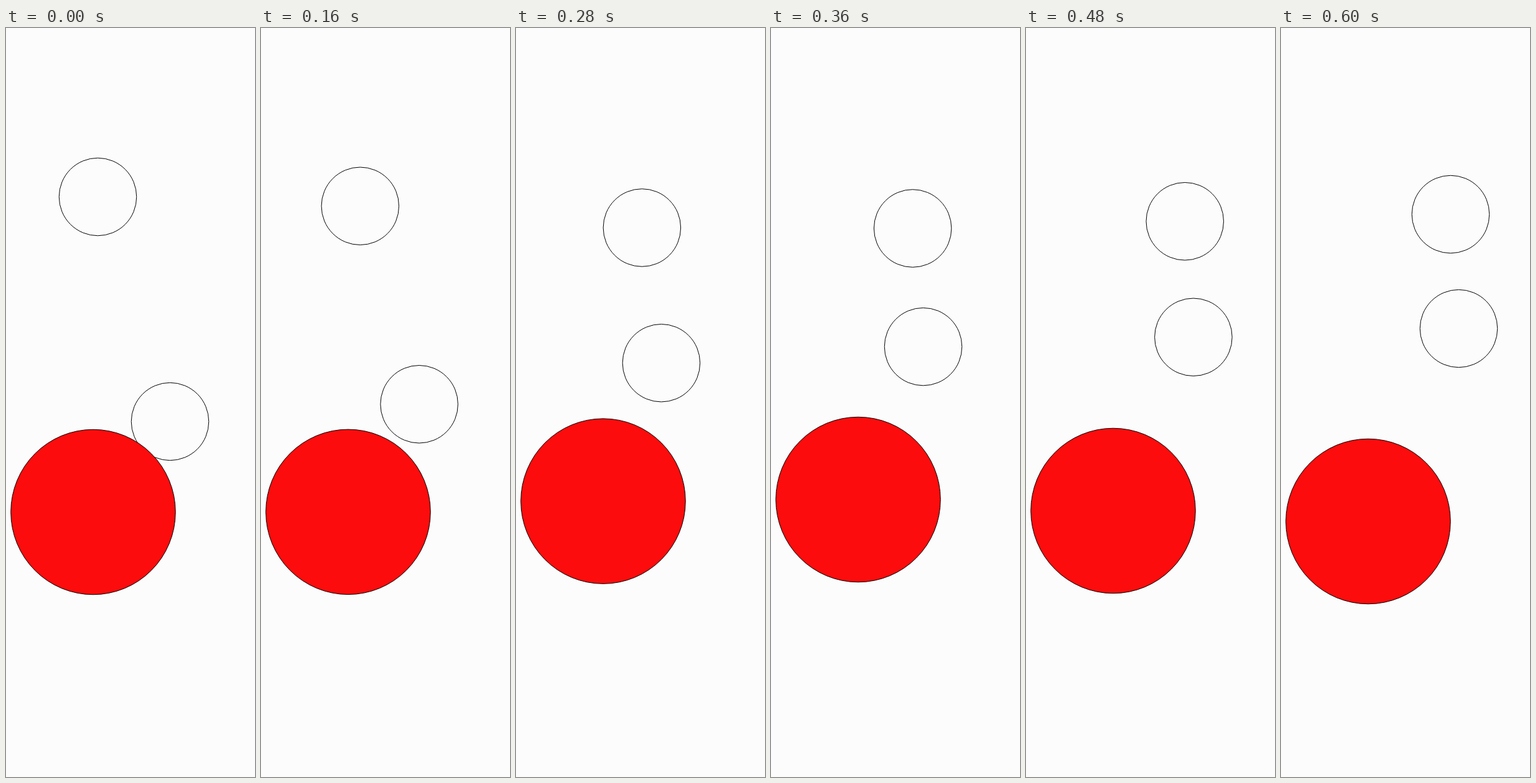
Animation, 400 px wide and 1200 px high, one loop 640 ms. Source, as an HTML page with a canvas:

```html
<!DOCTYPE html>
<html lang="en">
<head>
<meta charset="utf-8">
<title>Colliding circles</title>
<style>
  html, body { margin: 0; width: 100%; height: 100%; overflow: hidden; background: #fcfcfc; }
  canvas { display: block; }
</style>
</head>
<body>
<canvas id="stage" width="400" height="1200"></canvas>
<script>
const ctx = document.getElementById('stage').getContext('2d');
const LOOP = 640, STEP = 40;
const PAPER = '#fcfcfc', INK = '#000', RED = '#fc0c0c';

// Progress from 0 to 1 between two times, at even speed or eased at both ends.
const linear = (t, from, to) => Math.min(1, Math.max(0, (t - from) / (to - from)));
const ease = (t, from, to) => (1 - Math.cos(Math.PI * linear(t, from, to))) / 2;

function drawCircle(x, y, r, fill) {
  ctx.beginPath();
  ctx.arc(x, y, r, 0, Math.PI * 2);
  if (fill) {
    ctx.fillStyle = fill;
    ctx.fill();
  }
  ctx.stroke();
}

function draw(t) {
  ctx.fillStyle = PAPER;
  ctx.fillRect(0, 0, 400, 1200);
  ctx.strokeStyle = INK;
  ctx.lineWidth = 1;

  const drift = linear(t, 360, 600);
  // Upper circle dips to the right, then drifts up.
  drawCircle(
    147.5 + 88 * ease(t, 76, 428) + 37 * ease(t, 360, 590),
    270.5 + 50.5 * ease(t, 80, 300) - 22.5 * drift,
    62.25);
  // Lower circle rises, swinging left and then right.
  drawCircle(
    263.5 - 32 * ease(t, 80, 300) + 13 * ease(t, 260, 360) + 41 * ease(t, 360, 574),
    630.5 - 121.5 * ease(t, 56, 384) - 27.5 * drift,
    62.25);
  // Large circle lifts and sinks again.
  drawCircle(
    140,
    775.5 - 20 * ease(t, 150, 320) + 35 * ease(t, 364, 592),
    132.25, RED);
}

const start = performance.now();
function tick() {
  const elapsed = (performance.now() - start) % LOOP;
  draw(Math.floor(elapsed / STEP) * STEP);
  requestAnimationFrame(tick);
}
tick();
</script>
</body>
</html>
```
